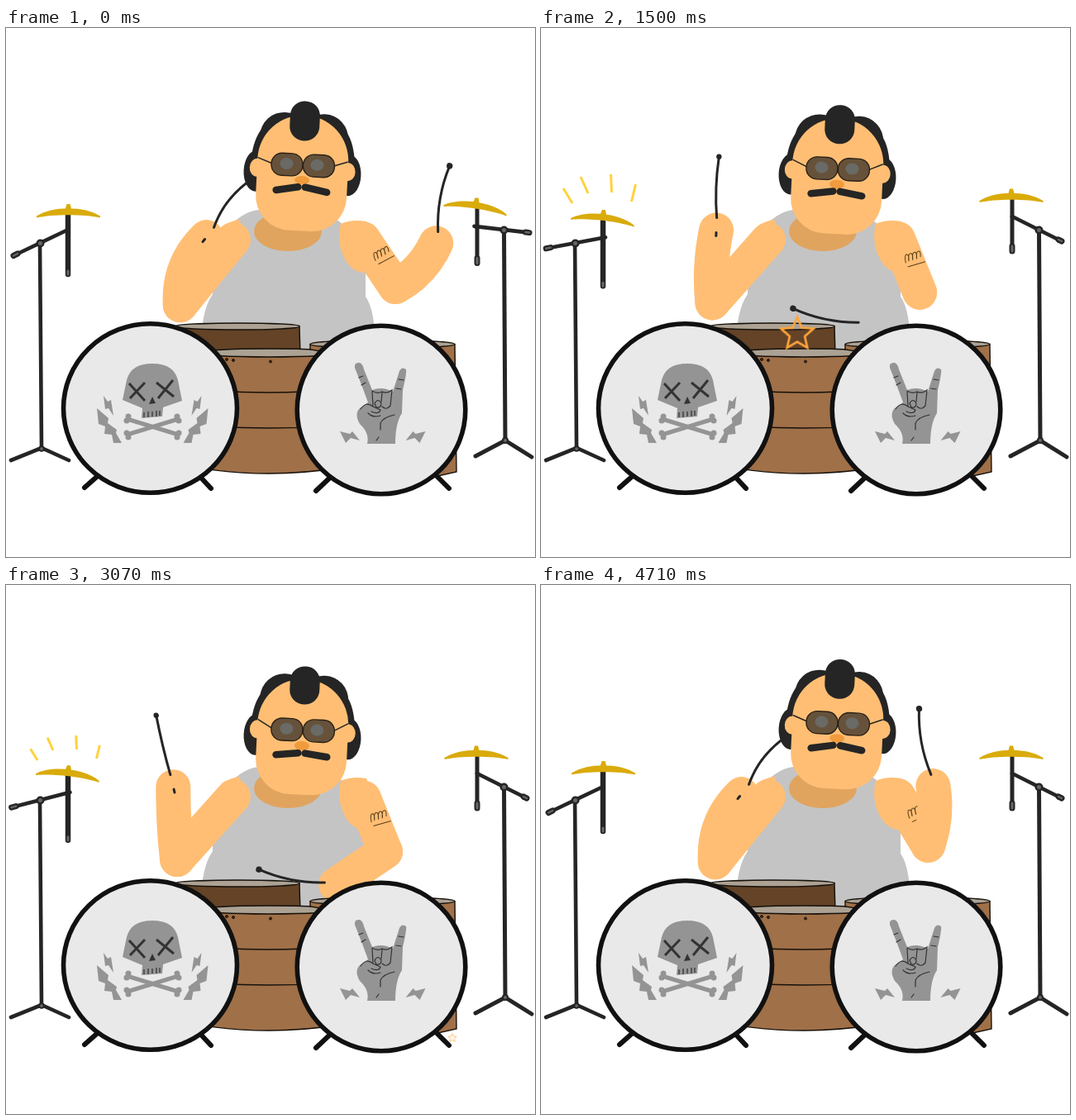
Recreate the animation shown at these times as an HTML page without scripts. Size 640 by 640 pixels, loop 4.78 s.

```html
<!DOCTYPE html>
<html lang="en">
<head>
<meta charset="utf-8">
<title>Drummer</title>
<style>
@property --side { syntax: "<number>"; inherits: true; initial-value: 1; }
@property --dip { syntax: "<number>"; inherits: true; initial-value: 0; }
@property --upper { syntax: "<number>"; inherits: true; initial-value: 0; }
@property --fore { syntax: "<number>"; inherits: true; initial-value: 0; }
@property --wrist { syntax: "<number>"; inherits: true; initial-value: 0; }
@property --bow { syntax: "<number>"; inherits: true; initial-value: 0; }
@property --tom { syntax: "<number>"; inherits: true; initial-value: 0; }
@property --lift { syntax: "<number>"; inherits: true; initial-value: 0; }
@property --reach { syntax: "<number>"; inherits: true; initial-value: 0; }
@property --rock { syntax: "<number>"; inherits: true; initial-value: 0; }
@property --live { syntax: "<number>"; inherits: true; initial-value: 1; }

html, body { margin: 0; width: 100%; height: 100%; overflow: hidden; background: #fff; }
svg { display: block; width: 100%; height: 100%; }
:root { --loop: 4.78s; --bar: calc(var(--loop) / 3); --beat: calc(var(--loop) / 6); }

.ink { fill: #252525; }
.line { fill: none; stroke: #252525; stroke-linecap: round; stroke-linejoin: round; }
.skin { fill: #ffbe74; }
.wood { fill: #a07048; stroke: #16100a; stroke-width: 1.4; }
.top { fill: #aca294; stroke: #16100a; stroke-width: 1.4; }
.bass { fill: #e9e9e9; stroke: #111; stroke-width: 5.6; }
.grey { fill: #949494; }
.brass { fill: #d9ab0b; }
.lens { fill: #66523b; stroke: #2b2015; stroke-width: 1.4; }

/* head: --side sways from 1 to -1, --dip nods from 0 to 1 */
.head {
  animation: sway var(--bar) ease-in-out infinite, nod var(--beat) ease-in-out infinite;
  transform: translate(calc(342.3px + var(--side) * 16.2px), calc(175.5px + var(--dip) * 66px)) rotate(calc(var(--side) * 2.8deg));
}
@keyframes sway { 0%, 77.5%, 100% { --side: 1; } 27.5%, 50% { --side: -1; } }
@keyframes nod { 0%, 95%, 100% { --dip: 0; } 36%, 56% { --dip: 1; } }
.crown { transform: translateY(calc(var(--dip) * -22px)); }
.mohawk { y: calc(var(--dip) * 14px - 87px); height: calc(48px - var(--dip) * 15px); }
.temples { transform: translateY(calc(var(--dip) * 12px - 10px)) scaleY(calc(1 + var(--dip) * 5)); vector-effect: non-scaling-stroke; }
.shades { transform: translateY(calc(var(--dip) * 13px - 9.5px)); }
.nose { cy: calc(8.5px + var(--dip) * 20px); ry: calc(5px + var(--dip) * 4px); }
.moustache { transform: translateY(calc(19.5px + var(--dip) * 16px)); }
.whisker { transform: translateX(-17.5px) rotate(calc(var(--dip) * 28deg - 10.5deg)); }

/* arms: angles in degrees, each joint relative to the one before */
.limb, .shaft { fill: none; stroke-linecap: round; vector-effect: non-scaling-stroke; }
.limb { stroke: #ffbe74; stroke-width: 42; }
.shaft { stroke: #252525; stroke-width: 3; }
.bent { transform: scaleY(calc(var(--bend) / 10)); }
.upper { transform: rotate(calc(var(--a) * 1deg)); }
.fore { transform: translateX(var(--upper-length)) rotate(calc(var(--b) * 1deg)); }
.hand { transform: translateX(var(--fore-length)) rotate(calc(var(--c) * 1deg)); }

.left.arm {
  --upper-length: 102px; --fore-length: 88px;
  --a: calc(var(--upper) + var(--tom) * 28);
  --b: calc(var(--fore) + var(--tom) * 75);
  --c: calc(var(--wrist) - var(--tom) * 46);
  --bend: calc(var(--bow) - var(--tom) * 44);
  animation: strike var(--beat) ease-in-out infinite, to-tom var(--loop) ease-in-out infinite;
}
@keyframes strike {
  0%, 91.1%, 100% { --upper: 129; --fore: -198; --wrist: 17; --bow: 20; }
  30.5% { --upper: 143; --fore: -208; --wrist: -10; --bow: -13; }
  40.2% { --upper: 120; --fore: -214; --wrist: 9; --bow: 13; }
  68%, 80.3% { --upper: 132.5; --fore: -243; --wrist: -37; --bow: -10; }
  88.3% { --upper: 131.5; --fore: -218.5; --wrist: -1; --bow: 7; }
}
@keyframes to-tom { 0%, 73%, 91%, 100% { --tom: 0; } 83.7% { --tom: 1; } }

.right.arm {
  --upper-length: 70px; --fore-length: 72px;
  --a: calc(68 - var(--reach) * 12 - var(--lift) * 5);
  --b: calc(79 + var(--lift) * (1 - var(--reach)) * 48 + var(--reach) * 178);
  --c: calc(45 - var(--reach) * 78);
  --bend: calc(var(--lift) * 8 - var(--reach) * 12);
  animation: drum var(--beat) ease-in-out infinite, reach var(--loop) ease-in-out infinite;
}
@keyframes drum {
  0%, 5%, 54%, 88%, 100% { --lift: 0; translate: 0 0; }
  30.5% { --lift: 1; translate: 0 0; }
  80.3% { --lift: -.08; translate: 4px 12px; }
}
@keyframes reach {
  0%, 90%, 100% { --reach: 1; }
  9%, 84% { --reach: 0; }
  98.5%, 99.9% { --reach: .77; }
}

/* cymbals: --rock is 0 at rest and 1 fully tipped */
.boom { transform: rotate(calc(var(--rock) * var(--live) * var(--swing))); }
.post { transform: translateY(calc(var(--rock) * var(--live) * 14.5px)); }
.plate { transform: translateY(calc(var(--rock) * var(--live) * var(--sink))) rotate(calc(min(1, var(--rock) * 4) * var(--live) * var(--tilt))); }
.left.cymbal {
  --swing: 15deg; --sink: 7px; --tilt: 6.5deg;
  animation: rock var(--beat) linear infinite, live var(--loop) step-end infinite;
}
.left .boom { transform-origin: 41px 260px; }
.right.cymbal { --swing: -20deg; --sink: 11px; --tilt: 8.5deg; animation: settle var(--loop) linear infinite; }
.right .boom { transform-origin: 602px 244px; }
@keyframes rock { 0%, 68%, 100% { --rock: 0; } 80.3% { --rock: .25; } 88.3% { --rock: 1; } }
@keyframes live { 0% { --live: 1; } 71%, 100% { --live: 0; } }
@keyframes settle { 0%, 100% { --rock: 1; } 9%, 99.9% { --rock: 0; } }

.spark { stroke: #ffd23c; stroke-width: 3; stroke-dasharray: 1 1; opacity: var(--live); animation: spark var(--beat) linear infinite; }
@keyframes spark {
  0%, 78% { stroke-dashoffset: 1; }
  80.3% { stroke-dashoffset: .72; }
  88%, 92% { stroke-dashoffset: 0; }
  100% { stroke-dashoffset: -1; }
}

.star { fill: none; stroke: #ffa53c; stroke-width: 2.7; animation: pop var(--loop) calc(var(--at) - var(--loop)) linear infinite; }
@keyframes pop { 0%, 7%, 100% { transform: scale(0); } 3.4% { transform: scale(1); } }
</style>
</head>
<body>
<svg viewBox="0 0 640 640">
  <defs>
    <path id="plate" class="brass" d="M-38.500 9.500C-20 -3 20 -3 38.500 9.500V11.500C20 7 -20 7 -38.500 11.500ZM-4 2L-2 -5H2L4 2Z"/>
    <g id="joint"><circle class="ink" r="5"/><circle r="2.500" fill="#666"/></g>
    <g id="bolts" class="grey">
      <path d="M118 445L123 452L127 450L130 469L124 460L120 461Z"/>
      <path d="M110 460L124 472L123 478L134 486L133 490L140 502H130L128 492L119 491L120 482L112 479Z"/>
    </g>
    <path id="flash" class="grey" d="M404 488L416 491L419 488L428 499L417 496L411 502Z"/>
    <g id="bone" class="grey">
      <path d="M148 473.500L207 491.500" stroke="#949494" stroke-width="5"/>
      <circle cx="148" cy="470" r="3.500"/><circle cx="146" cy="475" r="3.500"/>
      <circle cx="207" cy="495" r="3.500"/><circle cx="209" cy="490" r="3.500"/>
    </g>
    <g id="half-hair" class="ink">
      <path d="M0 -62H-34C-52 -60 -64 -38 -63 0H0Z"/>
      <ellipse cx="-56" rx="15" ry="25"/>
    </g>
    <g id="lobe"><circle class="ink" cx="-24" cy="-43" r="29.500"/><ellipse class="skin" cx="-55" cy="-4" rx="9" ry="11"/></g>
    <path id="temple" class="temples line" stroke-width="1.500" d="M-37 0L-54 -6"/>
    <path id="whisker" class="whisker line" stroke-width="8.500" d="M-13.500 0H13.500"/>
    <path id="star" d="M0 -21L5.500 -7.500L20 -6.500L9.200 3L12.400 17L0 9.700L-12.400 17L-9.200 3L-20 -6.500L-5.500 -7.500Z"/>
  </defs>

  <!-- cymbal stands -->
  <g class="line" stroke-width="4.600">
    <path d="M41 260L43 508M6 523L43 508L76 523"/>
    <path d="M602.500 244L604 499M568 518L604 499L636 519" stroke-width="5"/>
  </g>
  <g class="left cymbal">
    <g class="boom line"><path d="M10 275L75 244" stroke-width="4.600"/><path d="M9 275.500L14 273" stroke-width="7"/><path d="M9 275.500L14 273" stroke="#666" stroke-width="2.500"/></g>
    <g class="post line"><path d="M75 220V298" stroke-width="6.500"/><path d="M75 294V298" stroke="#666" stroke-width="3"/></g>
    <g transform="translate(75.500 218)"><use class="plate" href="#plate"/></g>
    <path class="spark" pathLength="1" d="M38 212L27 194"/>
    <path class="spark" pathLength="1" d="M57 200L48 180"/>
    <path class="spark" pathLength="1" d="M85.500 199L84.500 177"/>
    <path class="spark" pathLength="1" d="M109.500 210L114.500 189"/>
  </g>
  <g class="right cymbal">
    <g class="boom line"><path d="M570 228L630 258" stroke-width="4.600"/><path d="M626 256L630 258" stroke-width="7"/><path d="M626 256L630 258" stroke="#666" stroke-width="2.500"/></g>
    <g class="post line"><path d="M570 204V270" stroke-width="5"/><path d="M570 264V270" stroke-width="7"/><path d="M570 264V270" stroke="#666" stroke-width="3"/></g>
    <g transform="translate(569 199.500)"><use class="plate" href="#plate"/></g>
  </g>
  <use href="#joint" x="41.500" y="260.500"/>
  <use href="#joint" x="602.500" y="244.500"/>
  <use href="#joint" transform="translate(43 509) scale(.75)"/>
  <use href="#joint" transform="translate(604 499) scale(.8)"/>

  <!-- torso -->
  <path fill="#c4c4c4" d="M270 240Q290 220 308 220L378 227Q398 226 412 242L435 290V325Q447 340 448 400H236Q234 345 250 322V280Z"/>
  <ellipse cx="341" cy="246" rx="41" ry="24" fill="#e0a45f"/>
  <path class="skin" d="M262 240Q274 232 283 232Q290 262 276 284Q268 300 250 302Z"/>
  <g transform="translate(275 256)"><g class="left arm"><g class="upper">
    <path class="limb" d="M0 0H102"/>
    <g class="fore">
      <path class="limb bent" d="M0 0Q44 -10 88 0"/>
      <g class="hand">
        <path class="shaft" d="M-7 0H-3"/>
        <path class="shaft bent" d="M15 0Q50 -6 89 0"/>
        <circle class="ink" cx="89" r="3.200"/>
      </g>
    </g>
  </g></g></g>

  <g class="head">
    <use href="#half-hair"/><use href="#half-hair" transform="scale(-1 1)"/>
    <g class="crown"><use href="#lobe"/><use href="#lobe" transform="scale(-1 1)"/></g>
    <path class="skin" d="M-55 -15A55 55 0 0 1 55 -15V28A42 42 0 0 1 13 70H-13A42 42 0 0 1 -55 28Z"/>
    <rect class="mohawk ink" x="-18" width="36" rx="17.500"/>
    <use href="#temple"/><use href="#temple" transform="scale(-1 1)"/>
    <ellipse class="nose" rx="9" fill="#f09b3c"/>
    <g class="shades">
      <rect class="lens" x="-38" y="-13.500" width="38" height="27" rx="13"/>
      <rect class="lens" x="0.500" y="-13.500" width="38" height="27" rx="13"/>
      <g fill="#6a6a66"><ellipse cx="-19.500" cy="-1" rx="8" ry="7"/><ellipse cx="17.500" cy="-1" rx="8" ry="7"/></g>
    </g>
    <g class="moustache"><use href="#whisker"/><use href="#whisker" transform="scale(-1 1)"/></g>
  </g>

  <path class="skin" d="M405 237Q418 231 436 234L450 270L432 296Q420 295 412 283Q399 262 405 237Z"/>
  <g transform="translate(432 255)"><g class="right arm"><g class="upper">
    <path class="limb" d="M0 0H70"/>
    <path transform="translate(28 -10) rotate(-84)" fill="none" stroke="#5c3c18" d="M-12 4q1 -12 5 -9q1 3 -1 8q2 -11 6 -8q1 3 -1 8q2 -11 6 -8q1 3 -1 8q2 -11 6 -8q1 3 -1 7M-11 9H11"/>
    <g class="fore"><path class="limb bent" d="M0 0Q36 -10 72 0"/></g>
  </g></g></g>

  <!-- drums -->
  <path class="wood" style="fill:#644327" d="M205 361H355L356 395H205Z"/>
  <ellipse class="top" cx="280" cy="361" rx="75.500" ry="4"/>
  <path class="wood" d="M232 393H404V532Q318 546 232 532Z"/>
  <ellipse class="top" cx="318" cy="393" rx="86" ry="5"/>
  <path d="M232 437Q318 445 404 437M232 481Q318 487 404 481" fill="none" stroke="#16100a" stroke-width="1.500"/>
  <g fill="#4a3119" stroke="#16100a"><circle cx="267" cy="401" r="1.500"/><circle cx="275" cy="402" r="1.500"/><circle cx="320" cy="403.500" r="1.500"/></g>
  <path class="wood" d="M368 383H543L545 537L500 547V410L368 389Z"/>
  <ellipse class="top" cx="455.500" cy="382.500" rx="87.500" ry="5"/>
  <path class="line" style="stroke:#111" stroke-width="6" d="M112 541L95 556M234 542L248 557M393 543L375 560M519 540L536 557"/>
  <ellipse class="bass" cx="174.500" cy="460" rx="105" ry="102.300"/>
  <circle class="bass" cx="454" cy="462" r="101.800"/>

  <!-- skull and bones -->
  <use href="#bolts"/>
  <use href="#bolts" transform="matrix(-1 0 0 1 354.500 0)"/>
  <use href="#bone"/>
  <use href="#bone" transform="matrix(-1 0 0 1 355 0)"/>
  <path class="grey" d="M141 450L146 426Q151 406 177 406Q203 406 208 426L213 451L190 459L189 470L164 472L165 460Z"/>
  <path fill="none" stroke="#333" stroke-width="3" d="M149 430L168 451M168 429L150 448M182 429L203 446M202 426L184 448"/>
  <path fill="#333" d="M177 446L173 455L181 454Z"/>
  <path stroke="#333" stroke-width="1.300" d="M167 465V471M172 464V471M177 464V470M182 463V470M186 463V469"/>

  <!-- horned hand -->
  <use href="#flash"/>
  <use href="#flash" transform="matrix(-1 0 0 1 911.500 0)"/>
  <path class="grey" d="M422 411Q421 404 428 405Q432 407 433 413L443 438Q455 433 468 440L476 415Q479 409 484 413Q485 417 480 438L479 466Q471 478 471 503H437Q440 490 428 479Q421 467 428 460L438 453L431 434Z"/>
  <path fill="none" stroke="#333" stroke-width="1.200" stroke-linecap="round" d="M443 440L444 457M443 439Q449 443 455 440Q461 443 467 438L465 457Q460 463 455 458M455 441L454 452M446 454Q450 447 454 454Q454 460 448 459ZM429 461Q436 451 444 458L453 462Q451 468 442 464M438 466Q444 472 453 469M453 478Q456 471 470 468M453 478V486M448 499L451 495M427 423L432 421M430 432L435 429M475 425L481 426M472 436L478 437"/>

  <!-- the right stick lies over the drums -->
  <g transform="translate(432 255)"><g class="right arm"><g class="upper"><g class="fore"><g class="hand">
    <path class="shaft" d="M14 0Q55 -9 95 0"/>
    <circle class="ink" cx="95" r="3.700"/>
  </g></g></g></g></g>

  <g transform="translate(310 370)"><use class="star" href="#star" style="--at:1.34s"/></g>
  <g transform="translate(562 443)"><use class="star" href="#star" style="--at:2.13s"/></g>
  <g transform="translate(558 324)"><use class="star" href="#star" style="--at:2.43s"/></g>
  <g transform="translate(540 548)"><use class="star" href="#star" style="--at:2.78s"/></g>
  <g transform="translate(284 514)"><use class="star" href="#star" style="--at:3.27s"/></g>
</svg>
</body>
</html>
```
